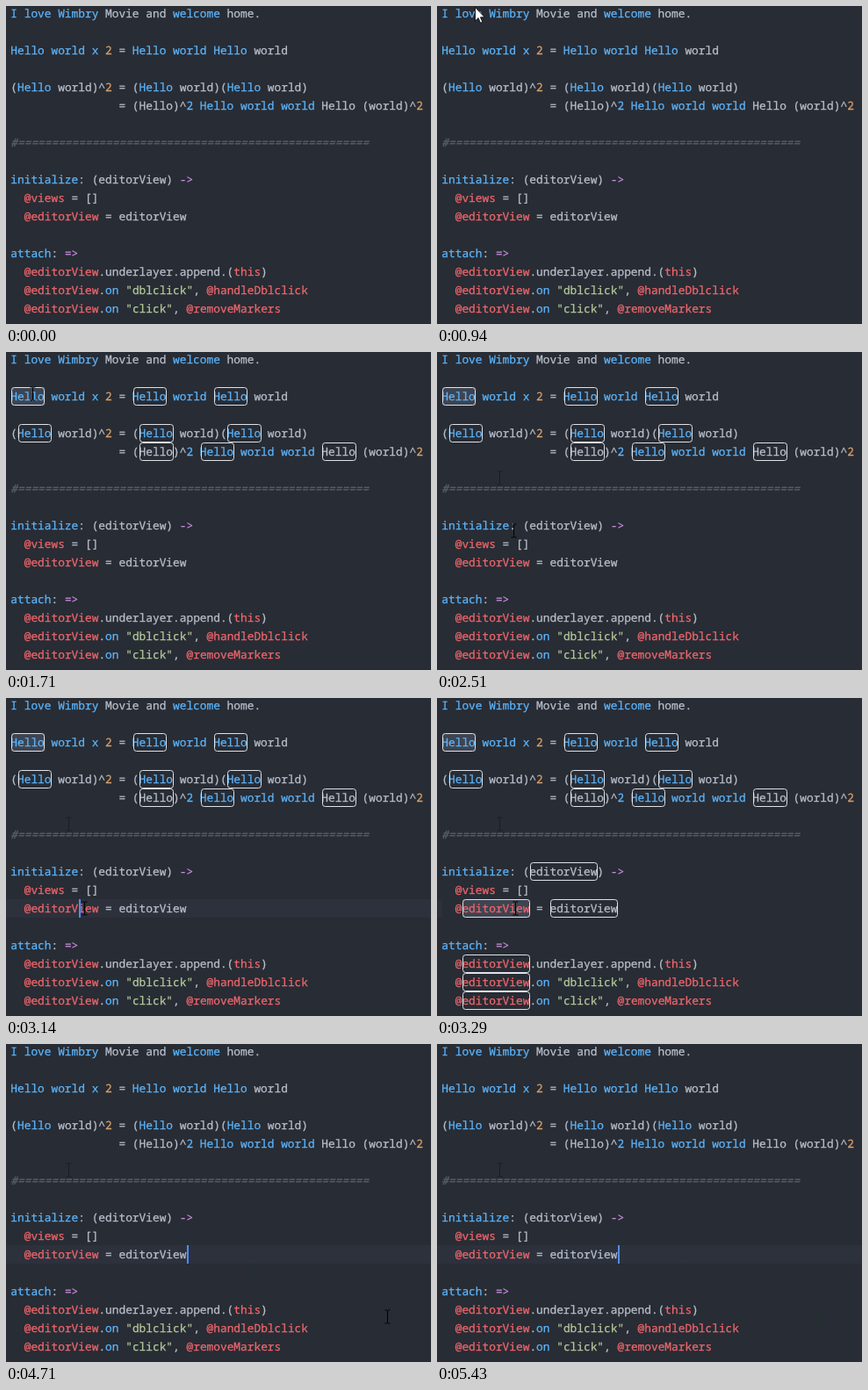
These frames come from a looping animation (484 by 362 pixels, 5510 ms). An HTML page:

```html
<!DOCTYPE html>
<html lang="en">
<meta charset="utf-8">
<style>
  html, body { margin: 0; width: 100%; height: 100%; overflow: hidden; background: #282c34; }
  svg { display: block; }
  text { font: 12.83px "Noto Sans Mono", "DejaVu Sans Mono", monospace; white-space: pre;
         text-rendering: geometricPrecision; color: #b9c0cc; }
  text, tspan { fill: currentColor; stroke: currentColor; stroke-width: .25; }
  .b { color: #5cb5fc; }
  .o { color: #d9a06a; }
  .r { color: #f0666c; }
  .p { color: #c98fe0; }
  .g { color: #b5ca9b; }
  .c { color: #5c6370; font-style: italic; }
  .sel { fill: #3e4451; }
  #line { fill: #2c313c; }
  #caret { fill: #528bff; }
  #marks { fill: none; stroke: #dfe2e8; }
</style>
<svg width="484" height="362" viewBox="0 0 484 362">
  <defs><path id="beam" d="M-3-7.5h2.5l.5.5.5-.5H3M0-7V7M-3 7.5h2.5L0 7l.5.5H3" fill="none"/></defs>
  <rect id="line" height="21"/>
  <g id="sels"></g>
  <g id="code"></g>
  <g id="marks"></g>
  <rect id="caret" width="2" height="21"/>
  <g id="trail"></g>
  <g id="mouse">
    <use id="ibeam" href="#beam" x=".5" y=".5" stroke="#000"/>
    <path id="arrow" d="M.5.5V16l3.6-3.4 2.4 5.6 2.3-1-2.4-5.4h4.8z" fill="#fff" stroke="#000" stroke-width=".8"/>
  </g>
</svg>
<script>
const LOOP = 5510, LEFT = 6, CHAR = 7.698, ROW = 21, TOP = -2;
const $ = id => document.getElementById(id);
const colX = col => LEFT + col * CHAR;
const rowY = row => TOP + row * ROW;
const show = (id, on) => $(id).setAttribute('visibility', on ? 'visible' : 'hidden');
const set = (id, attrs) => { for (const k in attrs) $(id).setAttribute(k, attrs[k]); };

// x{...} colours a run of text with class x
const source = [
  'b{I love Wimbry} Movie and b{welcome} home.',
  '',
  'b{Hello world x} o{2} = b{Hello world Hello} world',
  '',
  '(b{Hello} world)^o{2} = (b{Hello} world)(b{Hello} world)',
  ' '.repeat(16) + '= (Hello)^b{2 Hello world world} Hello (world)^o{2}',
  '',
  'c{#' + '='.repeat(52) + '}',
  '',
  'b{initialize}: (editorView) p{->}',
  '  r{@views} = []',
  '  r{@editorView} = editorView',
  '',
  'b{attach}: p{=>}',
  '  r{@editorView}.underlayer.append.(r{this})',
  '  r{@editorView}.b{on} g{"dblclick"}, r{@handleDblclick}',
  '  r{@editorView}.b{on} g{"click"}, r{@removeMarkers}'
];
const run = /(\w)\{(.*?)\}/g;

let code = '', marks = '';
source.forEach((s, row) => {
  code += `<text x="${LEFT - .7}" y="${rowY(row) + 15}">` +
    s.replace(run, '<tspan class="$1">$2</tspan>') + '</text>';
  for (const m of s.replace(run, '$2').matchAll(/\b(Hello|editorView)\b/g)) {
    const x = Math.round(colX(m.index)), right = Math.round(colX(m.index + m[0].length));
    marks += `<rect class="${m[0]}" x="${x + .5}" y="${rowY(row) + .5}" width="${right - x - 1}" height="20" rx="3"/>`;
  }
});
$('code').innerHTML = code;
$('marks').innerHTML = marks;

const selection = (id, row, col, len) =>
  `<rect id="${id}" class="sel" x="${colX(col)}" y="${rowY(row)}" width="${len * CHAR}" height="${ROW}" rx="2"/>`;
$('sels').innerHTML = selection('selHello', 2, 0, 5) + selection('selView', 11, 3, 10);

// faint pointer traces: appears at, x, y, colour, opacity
const traces = [
  [2346, 71.5, 143.5, '#15181d', .75],
  [3853, 280.5, 250.5, '#1c3a2b', .5],
  [4706, 434.5, 309.5, '#1c3a2b', .6]
];
$('trail').innerHTML = traces.map(([, x, y, c, o], i) =>
  `<use id="trace${i}" href="#beam" x="${x}" y="${y}" stroke="${c}" opacity="${o}"/>`).join('');

// pointer moves: start, end, steps, from, control, to
const moves = [
  [940, 1400, 7, [44, -1.7], [36, 23], [30, 47]],
  [2110, 2660, 8, [30, 47], [82, 151], [91, 228]],
  [2750, 2990, 4, [91, 228], [91, 235], [89, 239]],
  [3550, 4080, 8, [89, 239], [240, 250], [323, 250]],
  [4550, 4940, 6, [323, 250], [434, 310], [545, 370]]
];

function pointer(t) {
  const [start, end, n, a, c, b] = moves.filter(m => m[0] <= t).pop() || moves[0];
  const step = Math.min(n, Math.floor((t - start) / (end - start) * (n - 1) + 1.001));
  const u = step / n, e = u * u * (3 - 2 * u);
  return a.map((v, i) => Math.round(v * (1 - e) ** 2 + 2 * c[i] * e * (1 - e) + b[i] * e * e));
}

function draw(t) {
  const within = (a, b) => t >= a && t < b;
  const firstClick = within(3140, 3240), cleared = t >= 4550;

  show('line', t >= 3140);
  set('line', { y: rowY(11), width: firstClick || cleared ? 484 : LEFT });
  show('selHello', within(1630, 4550));
  show('selView', within(3240, 4550));

  for (const m of $('marks').children) {
    const hello = m.classList.contains('Hello');
    const on = within(3290, 4550) || hello && within(1710, 3240);
    m.setAttribute('visibility', on ? 'visible' : 'hidden');
  }

  show('caret', firstClick || within(4470, 4940) || t >= 5430);
  set('caret', { x: Math.round(colX(firstClick ? 10 : 26)), y: rowY(11) });

  const [x, y] = pointer(t), onScreen = within(940, 4940);
  set('mouse', { transform: `translate(${x} ${y})` });
  show('arrow', onScreen && t < 1016);
  show('ibeam', onScreen && t >= 1016);
  traces.forEach(([at], i) => show('trace' + i, t >= at));
}

const begin = performance.now();
function frame() {
  draw((performance.now() - begin) % LOOP);
  requestAnimationFrame(frame);
}
frame();
</script>
</html>
```
